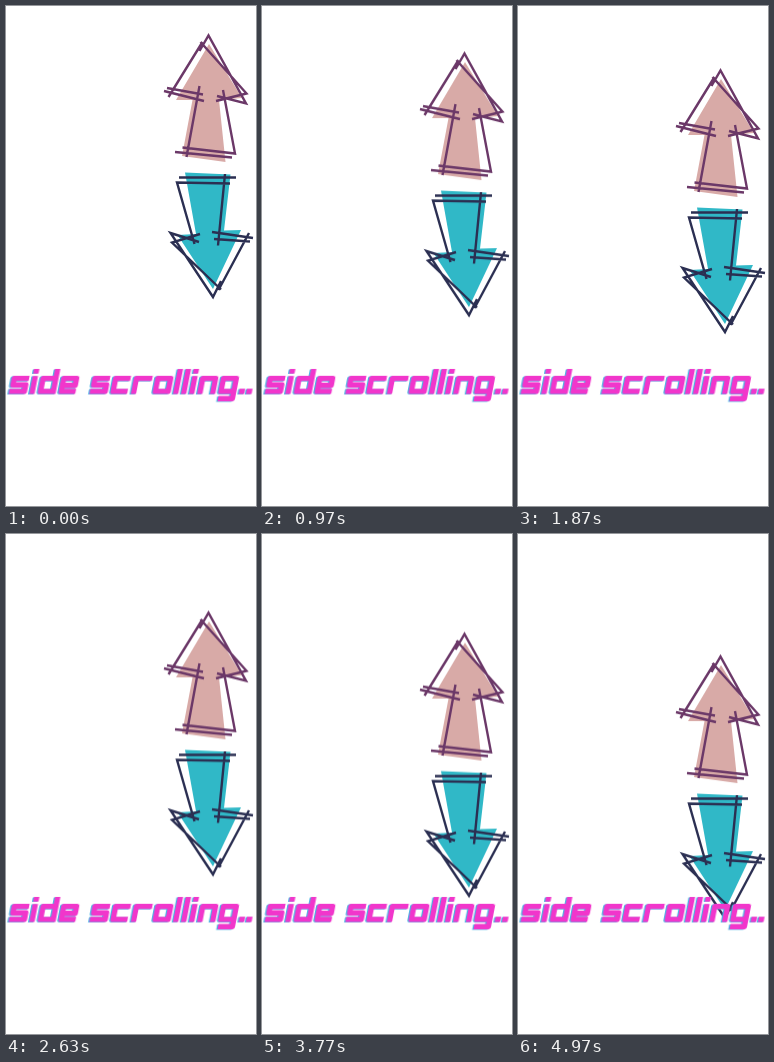
Write an HTML page that moves like this. It is 250 px wide and 500 px high and loops after 5010 ms.

```html
<!DOCTYPE html>
<html lang="en">
<head>
<meta charset="utf-8">
<title>side scrolling..</title>
<style>
  html, body { margin: 0; width: 100%; height: 100%; overflow: hidden; background: #fff; }
  svg { display: block; width: 250px; height: 500px; }
  path { fill: none; }
  .arrows { animation: sink 5010ms steps(150) -9ms infinite; }
  .line { stroke-width: 2.4; }
  .word { stroke-width: 5.3; stroke-linejoin: round; }
  @keyframes sink { to { transform: translateY(93.75px); } }
</style>
</head>
<body>
<svg viewBox="0 0 250 500" role="img" aria-label="side scrolling..">
  <g class="arrows">
    <polygon fill="#d8aaa7" points="203,38 236,92 213,94 219.5,156 176,150 186.5,94 170,94"/>
    <path class="line" stroke="#6b3868" d="
      M162.5 91L196.5 36 M193.5 45L202.5 29.5L240 97.5L211 90
      M194.5 36L240.5 87.5L210 95
      M161 82L197 88.5 M158 85L198 95
      M193.5 80L180.5 151 M217 84L229 147.5L176.5 141.5 M169 146L226 151.5"/>
    <polygon fill="#30b8c7" points="179,166.5 224.5,168.5 218,224.5 235,224 207,283 171.5,229 190,228"/>
    <path class="line" stroke="#2b2f52" d="
      M173 171.5H230 M188.5 238L171 176.5L224 177.5
      M219 168L212 239.5
      M194 228L166 236.5L215 283.5
      M193 236L164.5 227L207 291L215 275
      M243 227L212.5 284
      M206 226L247 232 M208 233L244 235.5"/>
  </g>
  <g id="word" class="word" transform="translate(0 388) skewX(-11)"></g>
</svg>
<script>
  // Centre lines of the letters, baseline at y = 0
  const glyphs = {
    s: 'M17.5-15.6H2.6V-9.1H15.4V-2.6H0',
    i: 'M2.6-18V0M2.6-25V-20.5',
    d: 'M15.4-25V0M15.4-15.6H2.6V-2.6H15.4',
    e: 'M17-2.6H2.6V-15.6H15.4V-8.6H2.6',
    c: 'M17.5-15.6H2.6V-2.6H17',
    r: 'M2.6 0V-15.6H18.5',
    o: 'M2.6-2.6V-15.6H15.4V-2.6Z',
    l: 'M2.6-25V0',
    n: 'M2.6 0V-15.6H15.4V0',
    g: 'M15.4-2.6H2.6V-15.6H15.4V4.7H1',
    '.': 'M0-2.6H5.6'
  };
  const advance = { i: 8.2, l: 8, r: 21.5, '.': 7.4, ' ': 10.5 };
  const word = document.getElementById('word');

  function write(text, x, y, color) {
    for (const ch of text) {
      if (glyphs[ch]) {
        const path = document.createElementNS('http://www.w3.org/2000/svg', 'path');
        path.setAttribute('d', glyphs[ch]);
        path.setAttribute('stroke', color);
        path.setAttribute('transform', `translate(${x} ${y})`);
        word.append(path);
      }
      x += advance[ch] || 20.7;
    }
  }

  write('side scrolling..', 1.4, 0.4, '#45b4e4');
  write('side scrolling..', 2.6, 0, '#f136cb');
</script>
</body>
</html>
```
